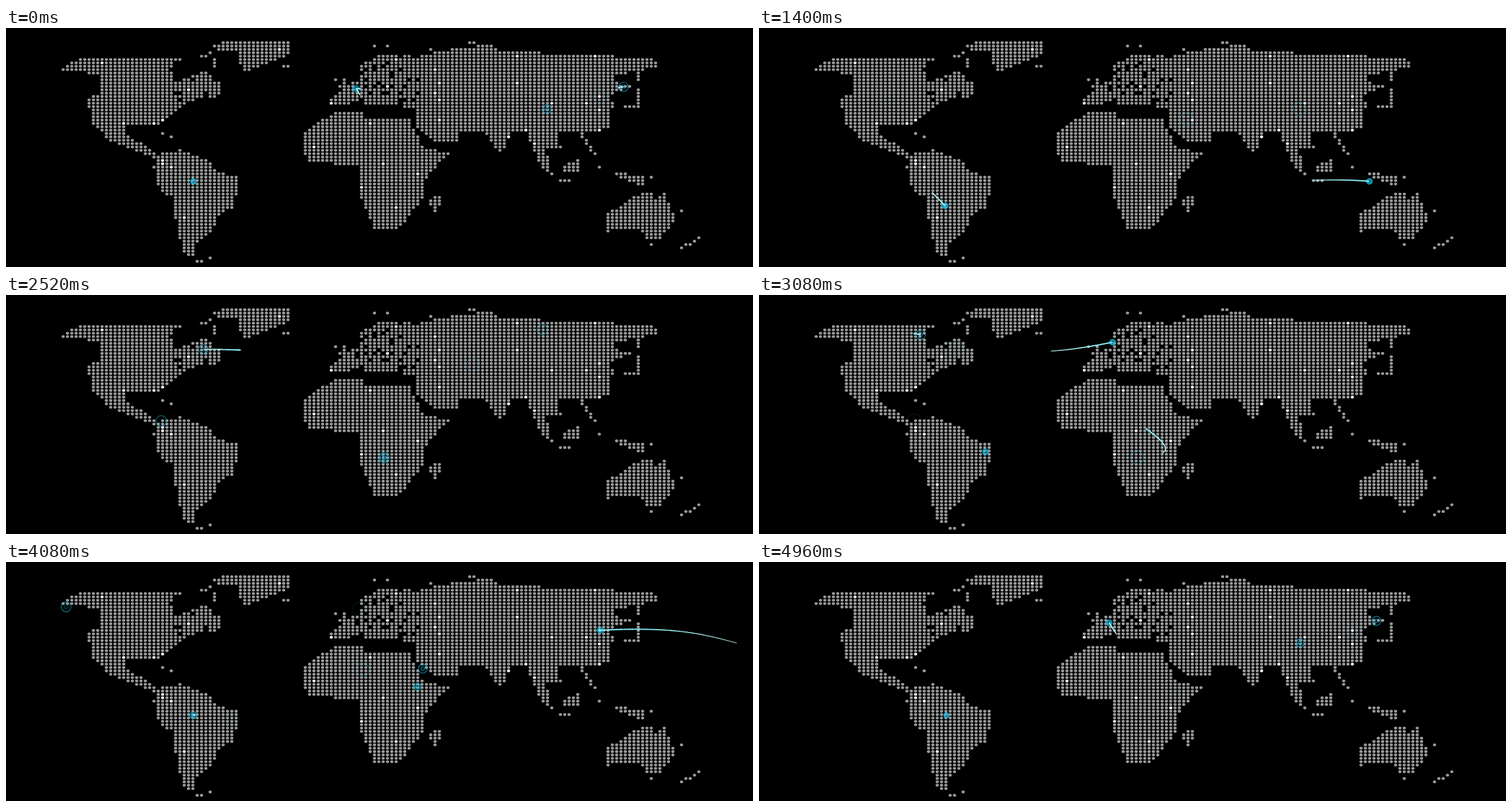
These frames come from a looping animation (1280 by 410 pixels, 5000 ms). An HTML page with a canvas:

```html
<!DOCTYPE html>
<html lang="en">
<head>
<meta charset="utf-8">
<title>Dotted world map</title>
<style>
  html, body { margin: 0; width: 100%; height: 100%; overflow: hidden; background: #000; }
  canvas { position: absolute; left: 0; top: 0; display: block; }
</style>
</head>
<body>
<canvas id="map" width="1280" height="410"></canvas>
<canvas id="net" width="1280" height="410"></canvas>
<script>
const LOOP = 5000, W = 1280, H = 410;
const map = document.getElementById('map').getContext('2d');
const net = document.getElementById('net').getContext('2d');

// Key points of the coastlines; the dot grid fills in the detail
const coasts = {
  northAmerica: 'M96 72L128 53L300 54L280 70L290 98L340 76L366 98L364 114L310 124L258 164L200 166L202 184L240 206L256 220L208 202L178 190L146 158L144 122L162 116L160 76Z',
  greenland: 'M356 34L370 25L488 25L486 42L408 74L396 38Z',
  southAmerica: 'M258 220L300 212L346 228L360 250L398 258L388 306L366 314L346 354L322 372L324 392L306 386L292 320L290 290L268 282L255 240Z',
  africa: 'M566 145L604 145L622 160L690 158L712 206L754 216L716 258L714 290L672 342L634 343L610 288L604 232L520 229L508 202L514 178Z',
  madagascar: 'M747 286L744 302L732 314L728 298Z',
  europe: 'M606 70L640 47L710 52L710 134L672 132L640 126L630 134L604 120L584 132L558 132L560 122L594 96L612 86Z',
  asia: 'M702 52L740 42L830 30L850 42L1110 54L1112 65L1042 80L1038 94L1064 100L1032 116L1034 172L940 176L948 206L922 206L934 250L914 230L894 176L864 176L848 212L818 174L778 174L774 192L740 196L704 166Z',
  borneo: 'M958 236L980 228L982 246L960 246Z',
  newGuinea: 'M1040 248L1090 258L1090 268Z',
  australia: 'M1034 320L1082 288L1106 286L1110 298L1126 284L1144 326L1120 360L1102 360L1080 340L1034 346Z'
};

// Small islands and island chains, drawn as lines
const chains = new Path2D('M162 178h3M262 183h10M283 188h3M346 393h6M324 398h12M472 65h16'
  + 'M334 47h14M350 40L360 68M564 86L574 104M582 84V104M630 31h24M724 38h10M790 26h16'
  + 'M1085 72V92M1084 104V136H1060M1040 128V138M986 180L1008 218M990 238V252'
  + 'M944 258L966 264M1018 236v5M1104 256v3M1104 368v4M1157 312L1163 319M1152 378L1168 373L1191 357');

function hash(a, b) {
  const s = Math.sin(a * 127.1 + b * 311.7) * 43758.5453;
  return s - Math.floor(s);
}

function drawMap() {
  const shapes = Object.values(coasts).map(d => new Path2D(d));
  const isLand = (x, y) => {
    map.lineWidth = 5;
    return map.isPointInStroke(chains, x, y)
      || shapes.some(s => map.isPointInPath(s, x, y) || map.isPointInStroke(s, x, y));
  };
  for (let j = 0; j < 66; j++) {
    for (let i = 0; i < 160; i++) {
      const x = 16.4 + i * 7.41, y = 25.2 + j * 5.77;
      const ragged = y < 135 && (x > 600 && x < 710 || x > 285 && x < 366);
      if (ragged && hash(i, j) < 0.12 || !isLand(x, y)) continue;
      map.fillStyle = hash(j, i) > 0.985 ? '#eee' : '#999';
      map.beginPath();
      map.ellipse(x, y, 2.7, 2.4, 0, 0, Math.PI * 2);
      map.fill();
    }
  }
}

// A trip hops from stop to stop. `trail` is the tail's delay in ms;
// `turn` holds the angles at which a hop leaves and meets its straight line.
const TRAVEL = 700, LIFE = 1300;
const trips = [
  { start: 4260, pace: 720, stops: [[705, 214], [600, 104], [733, 156], [1046, 263]],
    hops: [{ trail: 80, turn: [-.2, .2] }, { trail: 620, turn: [-.37, -.37] }, { trail: 160, turn: [.5, -.25] }] },
  { start: 4970, stops: [[1058, 101], [927, 139]], hops: [{ trail: 240, turn: [.1, -.3] }] },
  { start: 700, pace: 840, stops: [[213, 112], [319, 305], [338, 93], [606, 81]],
    hops: [{ trail: 70, turn: [.2, -.28] }, { trail: 60, turn: [-1.3, 1.2] }, { trail: 250, turn: [.05, -.15] }] },
  { start: 2625, stops: [[648, 279], [611, 185]], hops: [{ trail: 315, turn: [1.9, -.3] }] },
  { start: 3050, stops: [[277, 68], [103, 77]], hops: [{ trail: 90, turn: [.2, -.2] }] },
  { start: 3320, stops: [[388, 269], [321, 263]], hops: [{ trail: 80, turn: [.4, -.4] }] },
  { start: 3370, stops: [[1400, 175], [1018, 117]], hops: [{ trail: 440, turn: [.03, -.2] }] },
  { start: 4100, stops: [[714, 183], [927, 139]], hops: [{ trail: 80, turn: [-.2, .2] }] }
];

const pulses = [[801, 120, 1600], [919, 59, 1960], [266, 216, 1960], [648, 279, 1960], [321, 263, 4860]];
const arcs = [];

function curve([x0, y0], [x1, y1], [out, into]) {
  const angle = Math.atan2(y1 - y0, x1 - x0), dist = Math.hypot(x1 - x0, y1 - y0);
  const handle = turn => {
    const k = dist * (0.45 + 0.35 * Math.abs(turn));
    return [k * Math.cos(angle + turn), k * Math.sin(angle + turn)];
  };
  const a = handle(out), b = handle(into);
  return u => {
    const v = 1 - u, c = 3 * v * v * u, d = 3 * v * u * u;
    return [v ** 3 * x0 + c * (x0 + a[0]) + d * (x1 - b[0]) + u ** 3 * x1,
            v ** 3 * y0 + c * (y0 + a[1]) + d * (y1 - b[1]) + u ** 3 * y1];
  };
}

for (const { start, pace = 0, stops, hops } of trips) {
  pulses.push([...stops[0], start - 400]);
  hops.forEach(({ trail, turn }, i) => {
    const depart = start + i * pace;
    arcs.push({ depart, trail, at: curve(stops[i], stops[i + 1], turn) });
    pulses.push([...stops[i + 1], depart + TRAVEL - 150]);
  });
}

const clamp = v => Math.max(0, Math.min(1, v));
const since = (t, start) => (t - start + 2 * LOOP) % LOOP;

function ring(x, y, r, width, alpha) {
  net.globalAlpha = clamp(alpha);
  net.lineWidth = width;
  net.strokeStyle = '#12bde6';
  net.beginPath();
  net.arc(x, y, r, 0, Math.PI * 2);
  net.stroke();
}

function drawPulse(t, [x, y, start]) {
  const p = since(t, start) / LIFE;
  if (p >= 1) return;
  ring(x, y, 3 + 9 * (1 - (1 - p) ** 2), 1.2, 1.1 * (1 - p));
  ring(x, y, 3, 1.7, 1.4 - 3 * p);
}

function drawArc(t, { depart, trail, at }) {
  const age = since(t, depart), steps = 48;
  const head = clamp(age / TRAVEL), tail = clamp((age - trail) / TRAVEL);
  if (head <= tail) return;
  let a = at(tail);
  net.lineCap = 'round';
  for (let i = 1; i <= steps; i++) {
    const f = i / steps, b = at(tail + (head - tail) * f);
    net.globalAlpha = 0.65 + 0.35 * f;
    net.lineWidth = 1.4 + 0.8 * f;
    net.strokeStyle = `hsl(184 90% ${88 - 14 * f}%)`;
    net.beginPath();
    net.moveTo(...a);
    net.lineTo(...b);
    net.stroke();
    a = b;
  }
}

function frame() {
  const t = performance.now() % LOOP;
  net.clearRect(0, 0, W, H);
  pulses.forEach(p => drawPulse(t, p));
  arcs.forEach(a => drawArc(t, a));
  requestAnimationFrame(frame);
}

drawMap();
frame();
</script>
</body>
</html>
```
